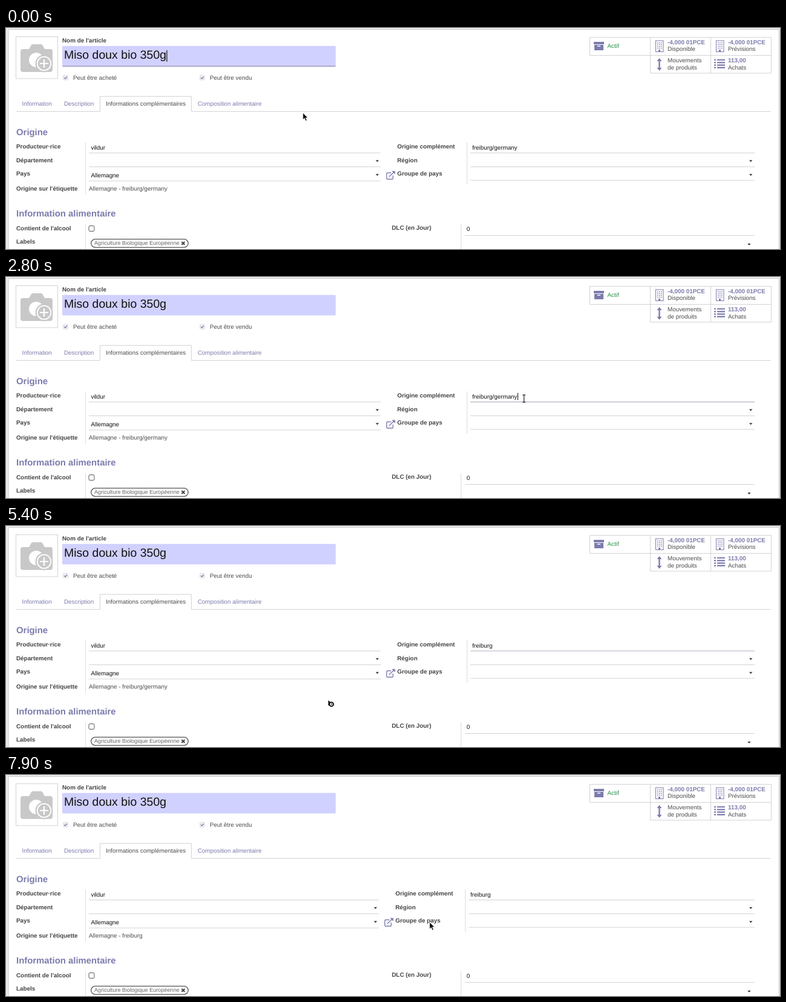
An HTML page that plays this animation: 1280x367 px, repeating every 8000 ms.

```html
<!DOCTYPE html>
<html lang="fr">
<head>
<meta charset="utf-8">
<title>Fiche article</title>
<style>
html, body { margin: 0; height: 100%; overflow: hidden; background: #ededee; }
svg { display: block; width: 1280px; height: 367px; }
text { font: 9.87px "Liberation Sans", Arial, sans-serif; fill: #4c4c4c; text-rendering: geometricPrecision; white-space: pre; }
.b { font-weight: 700; fill: #444; }
.v { fill: #111; }
.p { fill: #7c7bad; }
.h { font-size: 14.9px; font-weight: 700; fill: #7c7bad; }
.line { fill: none; stroke: #d2d2d4; }
.rule { fill: none; stroke: #dcdcde; }
.box { fill: none; stroke: #d3d3d8; }
.icon { fill: none; stroke: #7c7bad; }
</style>
</head>
<body>
<svg viewBox="0 0 1280 367">
  <rect x="4" y="2.5" width="1274.5" height="380" fill="#fff" stroke="#c8c8d0"/>

  <!-- picture placeholder -->
  <rect class="box" x="16.5" y="14.5" width="69" height="69.5"/>
  <g fill="#c8c8c8">
    <path d="M28 35H38L42 28Q43 27 45 27H57Q59 27 60 28L64 35H73Q77 35 77 39V69Q77 73 73 73H28Q24 73 24 69V39Q24 35 28 35Z"/>
    <circle cx="50" cy="53" r="12" fill="#fff"/>
    <circle cx="63" cy="59" r="14.5"/>
    <circle cx="63" cy="59" r="11.3" fill="none" stroke="#fff" stroke-width="1.8"/>
    <path d="M63 52V66M56 59H70" stroke="#fff" stroke-width="2.2"/>
  </g>

  <rect x="93" y="29.7" width="452.3" height="34" rx="1.5" fill="#d1d1ff"/>
  <path id="titleLine" d="M93.5 63.5H545" stroke="#7c7bad"/>
  <text class="v" x="96" y="51" style="font-size:19.5px">Miso doux bio 350g</text>
  <path id="titleCaret" d="M266 37V56" stroke="#111" stroke-width="1.2"/>

  <g fill="#ececf2" stroke="#e2e2e9">
    <rect x="94.5" y="78.5" width="8" height="8" rx="1.5"/>
    <rect x="320.5" y="78.5" width="8" height="8" rx="1.5"/>
  </g>
  <path d="M96.3 82.5L98 84.3L101 80.8M322.3 82.5L324 84.3L327 80.8" fill="none" stroke="#77779a" stroke-width="1.2"/>

  <!-- tabs -->
  <path class="box" d="M17 138.5H155.5V113.5H306.5V138.5H1265"/>

  <!-- stat buttons -->
  <path class="box" d="M965.5 15.5H1265.5V75H1065.5V15.5M965.5 15.5V45.5H1265.5M1165.5 15.5V75"/>
  <path class="p" d="M972 23H989V27H972ZM973 28H988V37H973ZM978 29.5V31H983V29.5Z" fill-rule="evenodd"/>
  <g id="building">
    <rect class="icon" x="1074.5" y="21" width="12.5" height="18.5"/>
    <path class="icon" stroke-width="1.6" stroke-dasharray="1.5 1.5" d="M1077 24.5H1085M1077 27.5H1085M1077 30.5H1085M1077 33.5H1085"/>
    <path class="p" d="M1079 36H1082V40H1079Z"/>
  </g>
  <use href="#building" x="100"/>
  <path class="p" d="M1080.5 50L1084.5 55H1081.7V66H1084.5L1080.5 71L1076.5 66H1079.3V55H1076.5Z"/>
  <path class="icon" stroke-width="2.2" d="M1171 53H1174M1176 53H1189M1171 57.3H1174M1176 57.3H1189M1171 61.6H1174M1176 61.6H1189M1171 65.9H1174M1176 65.9H1189"/>

  <!-- form rules -->
  <path class="rule" d="M131.5 190V277M131.5 326V367M752.5 326V367"/>
  <path class="line" d="M759 344.5H1238"/>
  <path id="lines" class="line"/>
  <path id="focusLine" fill="none"/>
  <path fill="#333" d="M1229 219.5h5.4l-2.7 3zM1229 242.5h5.4l-2.7 3zM1226.3 358h5.4l-2.7 3z"/>

  <rect x="137" y="328.5" width="9" height="9" rx="2" fill="#fff" stroke="#555"/>
  <rect x="140.7" y="350.7" width="160.6" height="13.6" rx="6.8" fill="#fff" stroke="#555" stroke-width="1.3"/>
  <clipPath id="tagClip"><rect x="141" y="353" width="160" height="11"/></clipPath>
  <text x="146" y="360" clip-path="url(#tagClip)" style="font-size:9.12px;fill:#666">Agriculture Biologique Européenne</text>
  <path d="M290.5 355L295.5 360M295.5 355L290.5 360" stroke="#444" stroke-width="2"/>

  <g id="labels"></g>
  <text id="origin" x="137" y="270.3"></text>

  <!-- right column, moves when the form is laid out again -->
  <g id="right">
    <path class="rule" d="M762.5 190V260"/>
    <path fill="#333" d="M611.3 219.5h5.4l-2.7 3zM611.3 242.5h5.4l-2.7 3z"/>
    <path class="icon" stroke-width="1.4" d="M637 240.5H631Q629.5 240.5 629.5 242V249.5Q629.5 251 631 251H638.5Q640 251 640 249.5V245M633.5 247L642 239"/>
    <path class="p" d="M638 237.5H643.5V243Z"/>
    <text class="b" x="647" y="200.3">Origine complément</text>
    <text class="b" x="647" y="222.5">Région</text>
    <text class="b" x="647" y="245">Groupe de pays</text>
    <rect id="selection" x="807" y="192.5" width="39" height="12" fill="#3481d8"/>
    <text class="v" x="771" y="201.5"><tspan id="town"></tspan><tspan id="country"></tspan></text>
    <path id="fieldCaret" stroke="#111"/>
  </g>

  <g id="cursor">
    <path id="arrow" d="M0 0V11.2L2.6 8.8L4.6 13.2L6.6 12.3L4.6 8.1H8.2Z" fill="#111" stroke="#fff" stroke-width=".6"/>
    <path id="hand" d="M.2 .6Q1.2 -.6 2.2 .6L3 4Q6.8 4 7.2 6V8.8L6.6 11.2H1.8L.3 8.6Q-.8 6.8 .2 6.4L1.2 6.6Z" fill="#111" stroke="#fff" stroke-width=".4"/>
    <path id="beam" d="M-2.5 -6H-.6L0 -5.4L.6 -6H2.5M-2.5 6H-.6L0 5.4L.6 6H2.5M0 -5.4V5.4" fill="none" stroke="#222" stroke-width="1.2"/>
    <g id="busy">
      <path d="M0 0V9L6 5Z" fill="#111"/>
      <circle cx="5.2" cy="6.5" r="3.4" fill="#fff" stroke="#111" stroke-width="1.9"/>
      <circle cx="5.6" cy="6.2" r="1.1" fill="#111"/>
    </g>
  </g>
</svg>
<script>
const $ = id => document.getElementById(id);
const show = (id, on) => $(id).style.display = on ? "" : "none";

const labels = [
  ["b", 93, 24.2, "Nom de l'article"],
  ["", 111, 85.7, "Peut être acheté"],
  ["", 337, 85.7, "Peut être vendu"],
  ["p", 26.5, 128.7, "Information"],
  ["p", 96, 128.7, "Description"],
  ["", 165, 128.7, "Informations complémentaires"],
  ["p", 317, 128.7, "Composition alimentaire"],
  ["h", 17, 177.6, "Origine"],
  ["b", 17, 200.3, "Producteur·rice"],
  ["v", 140.5, 201.5, "vildur"],
  ["b", 17, 222.5, "Département"],
  ["b", 17, 245, "Pays"],
  ["v", 140.5, 247.5, "Allemagne"],
  ["b", 17, 270, "Origine sur l'étiquette"],
  ["h", 17, 313.1, "Information alimentaire"],
  ["b", 17, 336, "Contient de l'alcool"],
  ["b", 17, 358.3, "Labels"],
  ["b", 638, 335.3, "DLC (en Jour)"],
  ["v", 761.7, 337.3, "0"],
  ["b p", 1094, 26.7, "-4,000 01PCE"],
  ["", 1094, 38.3, "Disponible"],
  ["b p", 1194, 26.7, "-4,000 01PCE"],
  ["", 1194, 38.3, "Prévisions"],
  ["", 1094, 57, "Mouvements"],
  ["", 1094, 68.6, "de produits"],
  ["b p", 1194, 57, "113,00"],
  ["", 1194, 68.6, "Achats"]
];
$("labels").innerHTML = labels.map(([c, x, y, s]) =>
  `<text class="${c}" x="${x}" y="${y}">${s}</text>`).join("") +
  `<text x="994.5" y="33" style="fill:#2a9148">Actif</text>`;

// pointer path: time, x, y
const path = [
  [0, 491, 141], [500, 373, 358], [600, 373, 358], [700, 373, 361], [800, 373, 361],
  [900, 373, 364], [1000, 373, 370], [1400, 373, 370], [1500, 510, 368], [1600, 650, 350],
  [1700, 808, 310], [1800, 808, 310], [1900, 812, 255], [2000, 816, 224.7], [2100, 816, 224.7],
  [2900, 862.5, 198.5], [4700, 862.5, 198.5], [5400, 533, 289.5], [5600, 404, 301],
  [5800, 263.5, 279.5], [5900, 263.5, 279.5], [6000, 228, 269], [6100, 190.5, 264.5],
  [6200, 210.5, 275.5], [6300, 210.5, 275.5], [6400, 204.5, 274], [6600, 240, 256],
  [6900, 342.5, 277.5], [7200, 510, 273], [7900, 700.5, 244.5]
];

function pointer(t) {
  const i = path.findIndex(k => k[0] > t);
  if (i < 0) return path[path.length - 1].slice(1);
  const [t0, x0, y0] = path[i - 1], [t1, x1, y1] = path[i];
  const f = (t - t0) / (t1 - t0);
  return [x0 + (x1 - x0) * f, y0 + (y1 - y0) * f];
}

function draw(t) {
  const within = (a, b) => t >= a && t < b;
  const shift = t >= 5500 ? -3 : 0;

  show("titleLine", t < 2800);
  show("titleCaret", t < 500 || within(1500, 2800));

  const left = 768 + shift, end = 619.5 + shift;
  $("lines").setAttribute("d",
    `M137 207.5H${end}M137 230.5H${end}M137 254H${end}` +
    `M${left} 207.5H1238M${left} 230.5H1238M${left} 253H1238`);
  $("right").setAttribute("transform", `translate(${shift})`);

  show("focusLine", within(2800, 5500));
  $("focusLine").setAttribute("d", "M768 207.5H1238");
  $("focusLine").setAttribute("stroke", t < 3300 ? "#a3a3b4" : t < 5000 ? "#77777c" : "#b4b4c4");

  const selected = within(3700, 4300);
  show("selection", selected);
  $("town").textContent = t < 4400 ? "freiburg/" : "freiburg";
  $("country").textContent = t < 4300 ? "germany" : "";
  $("country").style.fill = selected ? "#e4efff" : "";
  const caretX = t < 3700 ? 846.5 : t < 4400 ? 807.5 : 804.5;
  $("fieldCaret").setAttribute("d", `M${caretX} 192.5V204.5`);
  show("fieldCaret", within(2800, 3700) || within(4300, 5000));
  $("origin").textContent = "Allemagne - freiburg" + (t < 5500 ? "/germany" : "");

  const shape = within(1900, 2400) ? "hand" : within(2400, 4800) ? "beam"
    : within(5200, 5500) ? "busy" : "arrow";
  for (const id of ["arrow", "hand", "beam", "busy"]) show(id, id === shape);
  $("cursor").setAttribute("transform", `translate(${pointer(t)})`);
}

const start = performance.now();
function tick() {
  const t = (performance.now() - start) % 8000;
  draw(Math.floor(t / 100) * 100);
  requestAnimationFrame(tick);
}
tick();
</script>
</body>
</html>
```
